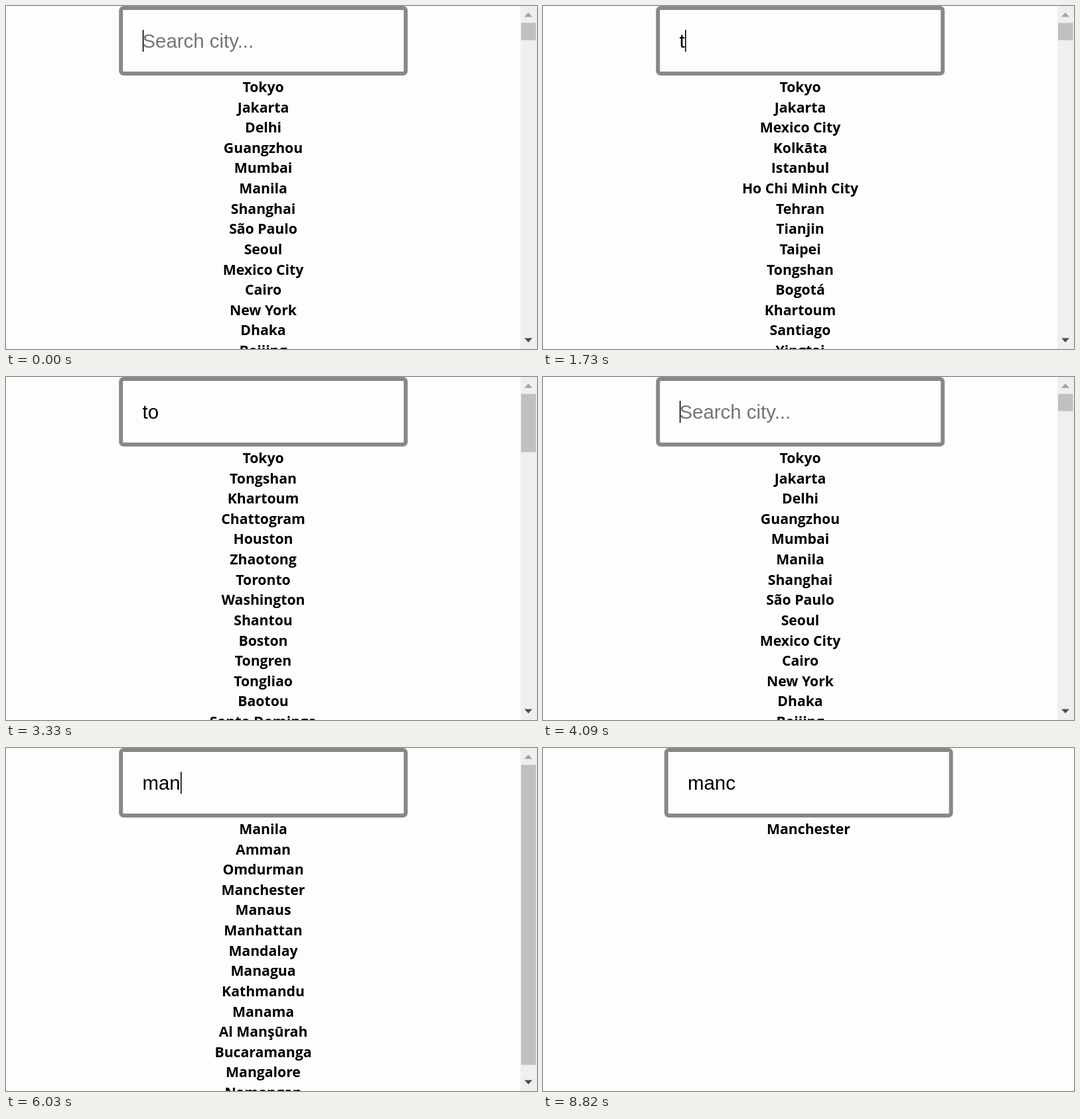
Animation of 800x518 px, one loop 9360 ms. Source, as an HTML page:

```html
<!DOCTYPE html>
<html lang="en">
<head>
<meta charset="utf-8">
<title>City search</title>
<style>
  html, body { margin: 0; width: 100%; height: 100%; overflow: hidden; background: #fefdfe; }
  svg { display: block; width: 800px; height: 518px; }
  #query { font: 29.4px "Liberation Sans", Arial, sans-serif; }
  #list { font: 700 21.2px "Open Sans", "Noto Sans", sans-serif; text-anchor: middle; }
</style>
</head>
<body>
<svg viewBox="0 0 800 518">
  <g id="page">
    <rect x="173.2" y="3" width="429" height="99" rx="4" fill="none" stroke="#8a878b" stroke-width="6"/>
    <text id="query" x="205.5" y="63"></text>
    <rect id="caret" y="36" width="1.6" height="33"/>
    <g id="list"></g>
  </g>
  <g id="bar">
    <rect x="775" width="25" height="518" fill="#f0eef1"/>
    <rect id="thumb" x="776" y="25.5" width="22.5" fill="#c1bfc2"/>
    <path d="M781 16.5l6-6.5 6 6.5z" fill="#a3a1a4"/>
    <path d="M781 501.5l6 6.5 6-6.5z" fill="#504e51"/>
  </g>
  <path id="pointer" d="M0 0V23L5 18.5L9 28L13 26L9 17H16Z" fill="#fefdfe" stroke="#77757a" stroke-width="1.4"/>
</svg>
<script>
const LOOP = 9360, ROW = 30.62;

// Each query: scrollbar thumb height (0 = no scrollbar) and visible matches.
const results = {
  "": [26, "Tokyo,Jakarta,Delhi,Guangzhou,Mumbai,Manila,Shanghai,São Paulo,Seoul,Mexico City,Cairo,New York,Dhaka,Beijing"],
  t: [26, "Tokyo,Jakarta,Mexico City,Kolkāta,Istanbul,Ho Chi Minh City,Tehran,Tianjin,Taipei,Tongshan,Bogotá,Khartoum,Santiago,Yingtai"],
  to: [88, "Tokyo,Tongshan,Khartoum,Chattogram,Houston,Zhaotong,Toronto,Washington,Shantou,Boston,Tongren,Tongliao,Baotou,Santo Domingo"],
  tok: [0, "Tokyo,Vladivostok"],
  m: [26, "Mumbai,Manila,Mexico City,Moscow,Ho Chi Minh City,Lima,Kuala Lumpur,Ahmedabad,Dar es Salaam,Khartoum,Zhumadian,Chattogram,Maoming,Madrid"],
  ma: [40, "Manila,Lima,Zhumadian,Maoming,Madrid,Amman,Yokohama,Mashhad,Omdurman,Manchester,Maracaibo,Manaus,Makassar,Manhattan"],
  man: [453, "Manila,Amman,Omdurman,Manchester,Manaus,Manhattan,Mandalay,Managua,Kathmandu,Manama,Al Manşūrah,Bucaramanga,Mangalore,Namangan"],
  manc: [0, "Manchester"]
};

const typing = [[0, ""], [1730, "t"], [2090, "to"], [2480, "tok"], [3330, "to"], [3700, "t"],
  [4090, ""], [4730, "m"], [5120, "ma"], [6030, "man"], [8290, "manc"]];

const caretHidden = [[380, 910], [1450, 1730], [3030, 3550], [4610, 4730], [5640, 6030],
  [6550, 7090], [7640, 8150], [8820, LOOP]];

const el = id => document.getElementById(id);
const show = (id, on) => el(id).setAttribute("visibility", on ? "visible" : "hidden");
let shown = null;

function showQuery(text) {
  const [thumb, cities] = results[text];
  const query = el("query");
  query.textContent = text || "Search city...";
  query.setAttribute("fill", text ? "#000" : "#757376");
  el("caret").setAttribute("x", 205.8 + (text ? query.getComputedTextLength() : 0));
  el("list").innerHTML = cities.split(",")
    .map((city, i) => `<text x="387.5" y="${130 + i * ROW}">${city}</text>`).join("");
  el("thumb").setAttribute("height", thumb);
  el("page").setAttribute("transform", `translate(${thumb ? 0 : 12.5})`);
  show("bar", thumb);
  shown = text;
}

function draw(now) {
  const t = now % LOOP;
  const text = typing.findLast(([start]) => t >= start)[1];
  if (text !== shown) showQuery(text);
  show("caret", !caretHidden.some(([from, to]) => t >= from && t < to));

  // The pointer slips in over the left edge in four steps.
  const step = Math.min(3, Math.floor((t - 6330) / 83));
  el("pointer").setAttribute("transform", `translate(${-5 - (3 - step) * 3} 155)`);
  show("pointer", t >= 6330 && t < 8290);
  requestAnimationFrame(draw);
}
requestAnimationFrame(draw);
</script>
</body>
</html>
```
